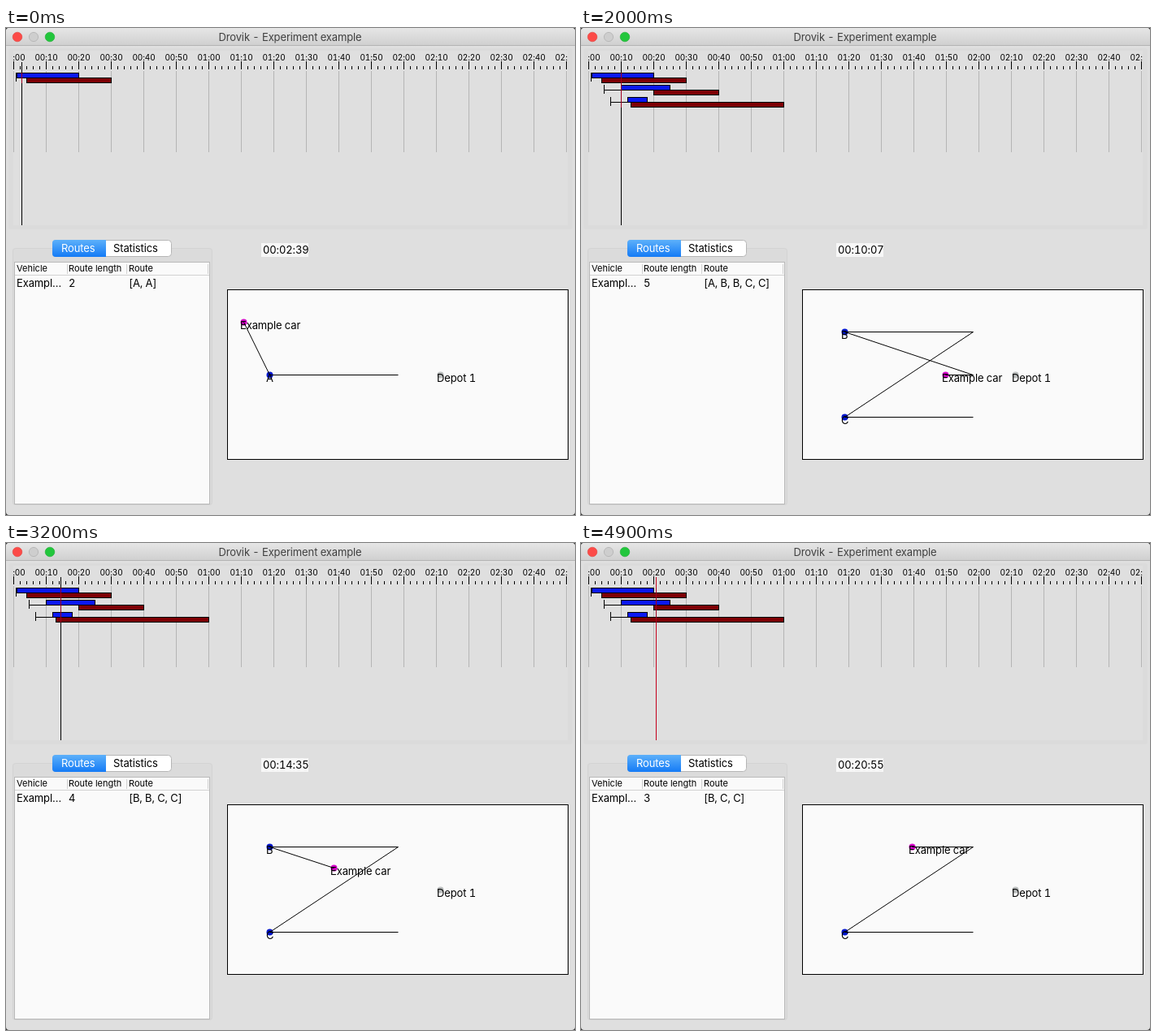
An HTML page that plays this animation: 700 by 600 pixels, repeating every 5000 ms.

```html
<!DOCTYPE html>
<html lang="en">
<head>
<meta charset="utf-8">
<title>Experiment example</title>
<style>
  html, body { margin: 0; width: 100%; height: 100%; overflow: hidden; background: #333; }
  svg { display: block; }
  text {
    font: 13px Inter, "Open Sans", sans-serif;
    letter-spacing: -.12px;
    font-variant-numeric: tabular-nums;
    white-space: pre;
  }
  .small { font-size: 11px; letter-spacing: 0; }
  .axis { font-size: 10px; letter-spacing: -.1px; text-anchor: middle; }
  .title { text-anchor: middle; fill: #404040; }
  .crisp { shape-rendering: crispEdges; }
</style>
</head>
<body>
<svg width="700" height="600" viewBox="0 0 700 600">
  <defs>
    <linearGradient id="bar" x2="0" y2="1">
      <stop stop-color="#e6e6e6"/><stop offset="1" stop-color="#d0d0d0"/>
    </linearGradient>
    <linearGradient id="tab" x2="0" y2="1">
      <stop stop-color="#5db0fa"/><stop offset="1" stop-color="#147bf6"/>
    </linearGradient>
    <clipPath id="view"><rect x="9" y="26" width="682" height="218"/></clipPath>
  </defs>

  <rect width="700" height="600" rx="4" fill="#dfdfdf"/>
  <path d="M0 21V4a4 4 0 0 1 4-4H696a4 4 0 0 1 4 4V21z" fill="url(#bar)"/>
  <path d="M0 21.5H700" stroke="#b4b4b4"/>
  <circle cx="14" cy="11" r="5.8" fill="#fc4b48" stroke="#e0403c" stroke-width=".6"/>
  <circle cx="34" cy="11" r="5.6" fill="#cecece" stroke="#b2b2b2" stroke-width=".8"/>
  <circle cx="54" cy="11" r="5.8" fill="#22c63c" stroke="#1aac2e" stroke-width=".6"/>
  <text class="title" x="349.5" y="16">Drovik - Experiment example</text>

  <rect x="3" y="25" width="694" height="223" rx="3" fill="#dbdbdb"/>
  <rect x="9" y="28" width="682" height="215" fill="#dfdfdf"/>
  <g id="timeline" clip-path="url(#view)"></g>
  <g id="cursor" class="crisp">
    <rect id="line" y="42" width="1" height="201"/>
    <rect id="glow" y="55" width="1" fill="#a00020"/>
  </g>

  <rect x="8.5" y="271.5" width="245" height="316" rx="3" fill="#dbdbdb" stroke="#d3d3d3"/>
  <rect x="57.5" y="261.5" width="146" height="20" rx="4" fill="#fff" stroke="#b6b6b6"/>
  <path d="M123 261V282H61a4 4 0 0 1-4-4V265a4 4 0 0 1 4-4z" fill="url(#tab)"/>
  <text x="68" y="276" fill="#fff">Routes</text>
  <text x="132" y="276">Statistics</text>

  <rect x="10.5" y="288.5" width="240" height="298" fill="#fafafa" stroke="#b9b9b9"/>
  <path d="M11 304.5H250M75.5 291V303M148.5 291V303M248.5 291V303" stroke="#d2d2d2"/>
  <text class="small" x="13" y="300">Vehicle</text>
  <text class="small" x="77" y="300">Route length</text>
  <text class="small" x="151" y="300">Route</text>
  <text x="13" y="319">Exampl…</text>
  <text id="count" x="77" y="319"></text>
  <text id="route" x="151" y="319"></text>

  <rect x="314" y="265" width="58" height="17" fill="#f7f7f7"/>
  <text id="clock" x="316" y="278"></text>

  <rect x="272.5" y="322.5" width="419" height="209" fill="#fafafa" stroke="#000"/>
  <g id="map"></g>
  <path id="path" fill="none" stroke="#000" transform="translate(.5 .5)"/>
</svg>

<script>
const $ = id => document.getElementById(id);

function add(parent, tag, attrs, text) {
  const el = document.createElementNS("http://www.w3.org/2000/svg", tag);
  for (const k in attrs) el.setAttribute(k, attrs[k]);
  if (text) el.textContent = text;
  parent.append(el);
  return el;
}

const pad = n => String(n).padStart(2, "0");
const show = (el, on) => el.setAttribute("display", on ? "inline" : "none");

// Timeline: 4 px per simulated minute, starting at x = 9
const timeX = min => 9 + 4 * min;
const timeline = $("timeline");
const block = (parent, x, y, w, h, fill) =>
  add(parent, "rect", { x, y, width: w, height: h, fill, class: "crisp" });

for (let min = 0; min <= 170; min += 2) {
  const x = timeX(min), major = min % 10 === 0;
  block(timeline, x, major ? 41 : 47, 1, major ? 10 : 4, "#000");
  if (!major) continue;
  block(timeline, x, 53, 1, 100, "#b5b5b5");
  add(timeline, "text", { x: x + .5, y: 40, class: "axis" },
    pad(Math.floor(min / 60)) + ":" + pad(min % 60));
}

// Orders: announce minute, pickup window, delivery window, map row
const orders = [
  { name: "A", at: 1, pick: [1, 20], drop: [4, 30], y: 427 },
  { name: "B", at: 5, pick: [10, 25], drop: [20, 40], y: 374 },
  { name: "C", at: 7, pick: [12, 18], drop: [13, 60], y: 479 }
];

function windowBar(parent, [from, to], y, fill) {
  add(parent, "rect", {
    x: timeX(from) + .5, y: y + .5, width: 4 * (to - from), height: 6, fill, stroke: "#000"
  });
}

const map = $("map");

function marker(label, fill) {
  const g = add(map, "g");
  add(g, "circle", { cx: .5, cy: .5, r: 4, fill });
  add(g, "text", { x: -4, y: 9 }, label);
  return g;
}
const place = (g, x, y) => g.setAttribute("transform", `translate(${x} ${y})`);

place(marker("Depot 1", "#b9bcbc"), 534, 427);

const start = { x: 292, y: 362 };
const stops = [];
let last = start, total = 0;

function addStop(order, x) {
  total += Math.hypot(x - last.x, order.y - last.y);
  last = { order, x, y: order.y, dist: total };
  stops.push(last);
  return last;
}

orders.forEach((o, i) => {
  const y = 55 + 15 * i, x = timeX(o.at) - 1;
  o.row = add(timeline, "g");
  block(o.row, x, y, 1, 11, "#000");
  block(o.row, x, y + 6, timeX(o.pick[0]) - x, 1, "#000");
  windowBar(o.row, o.pick, y, "#0a18f2");
  windowBar(o.row, o.drop, y + 6, "#7e0004");
  o.dot = marker(o.name, "#0016cc");
  place(o.dot, 324, o.y);
  o.pickup = addStop(o, 324);
  addStop(o, 482);
});
const car = marker("Example car", "#d400c8");

// Simulated seconds at given ticks of 100 ms; the simulator advances in steps of 4 s
const keys = [[0, 159], [6, 295], [13, 451], [20, 607], [28, 783], [36, 963], [49, 1255]];
const speed = .4385;

function simTime(tick) {
  const i = Math.max(1, keys.findIndex(k => k[0] >= tick));
  const [t0, s0] = keys[i - 1], [t1, s1] = keys[i];
  const s = s0 + (s1 - s0) * (tick - t0) / (t1 - t0);
  return Math.round((s - 3) / 4) * 4 + 3;
}

function carAt(dist) {
  const i = stops.findIndex(p => p.dist > dist);
  const from = stops[i - 1] || { ...start, dist: 0 }, to = stops[i];
  const f = (dist - from.dist) / (to.dist - from.dist);
  return {
    x: Math.round(from.x + (to.x - from.x) * f),
    y: Math.round(from.y + (to.y - from.y) * f)
  };
}

function draw(tick) {
  const s = simTime(tick);
  const dist = (s - keys[0][1]) * speed;
  const known = o => s >= o.at * 60;
  const left = stops.filter(p => p.dist > dist && known(p.order));
  const pos = carAt(dist);

  let rows = 0;
  for (const o of orders) {
    show(o.row, known(o));
    show(o.dot, left.includes(o.pickup));
    if (known(o)) rows++;
  }

  place(car, pos.x, pos.y);
  $("path").setAttribute("d", "M" + [pos, ...left].map(p => p.x + " " + p.y).join("L"));

  $("clock").textContent = "00:" + pad(Math.floor(s / 60)) + ":" + pad(s % 60);
  $("count").textContent = left.length;
  $("route").textContent = "[" + left.map(p => p.order.name).join(", ") + "]";

  $("cursor").setAttribute("transform", `translate(${Math.floor(timeX(s / 60))} 0)`);
  $("line").setAttribute("fill", s % 15 >= 10 ? "#c4001c" : "#000");
  $("glow").setAttribute("height", 15 * rows - 2);
}

let shown = -1;
function loop(now) {
  const tick = Math.floor(now % 5000 / 100);
  if (tick !== shown) draw(shown = tick);
  requestAnimationFrame(loop);
}
draw(0);
requestAnimationFrame(loop);
</script>
</body>
</html>
```
